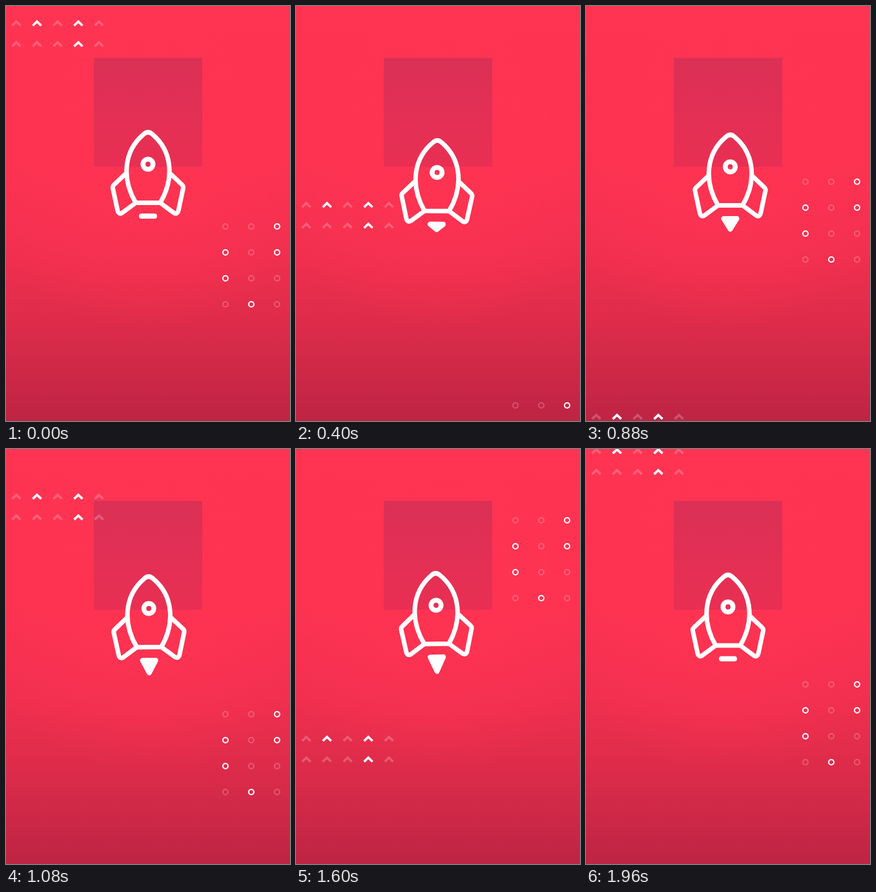
Write an HTML page that moves like this. It is 440 px wide and 640 px high and loops after 2000 ms.

```html
<!DOCTYPE html>
<html lang="en">
<head>
<meta charset="utf-8">
<title>Rocket</title>
<style>
  html, body { margin: 0; width: 100%; height: 100%; overflow: hidden; background: #ff3352; }
  svg { display: block; width: 440px; height: 640px; }
</style>
</head>
<body>
<svg viewBox="0 0 440 640">
  <defs>
    <linearGradient id="sky" x1="0" y1="0" x2="0" y2="1">
      <stop offset="0" stop-color="#ff3453"/>
      <stop offset=".36" stop-color="#fd3251"/>
      <stop offset=".6" stop-color="#f02f4f"/>
      <stop offset=".78" stop-color="#dc2b4a"/>
      <stop offset="1" stop-color="#be2443"/>
    </linearGradient>
    <radialGradient id="glow" gradientUnits="userSpaceOnUse" cx="220" cy="200" r="300">
      <stop offset="0" stop-color="#ff3352"/>
      <stop offset=".5" stop-color="#ff3352" stop-opacity=".6"/>
      <stop offset="1" stop-color="#ff3352" stop-opacity="0"/>
    </radialGradient>
    <linearGradient id="shade" x1="0" y1="0" x2="0" y2="1">
      <stop offset="0" stop-color="#db3055"/>
      <stop offset="1" stop-color="#e92f53"/>
    </linearGradient>
  </defs>
  <rect width="440" height="640" fill="url(#sky)"/>
  <rect width="440" height="640" fill="url(#glow)"/>
  <rect x="136" y="80" width="168" height="168" fill="url(#shade)"/>

  <g id="chevrons" fill="none" stroke="#fff" stroke-width="3.6"></g>
  <g id="rings" fill="none" stroke="#fff" stroke-width="2"></g>

  <g id="rocket" fill="none" stroke="#fff" stroke-width="7" stroke-linejoin="round" stroke-linecap="round">
    <path d="M201 303.5C180 268 181 225 213 198Q220 191.500 227 198C259 225 260 268 239 303.500Z"/>
    <path id="fin" d="M186 258L167 276Q164.800 278 165.500 281L173 316Q175 322 180 319L201 303.500"/>
    <use href="#fin" transform="matrix(-1 0 0 1 440 0)"/>
    <circle cx="220" cy="244" r="7.700" stroke-width="7.600"/>
    <path id="flame" fill="#fff" stroke-width="8"/>
  </g>
</svg>
<script>
const $ = id => document.getElementById(id);
const LOOP = 2000, STEP = 40, FPS = 30;

// Rows of marks: "1" is bright, "0" is faint.
function fillGrid(group, rows, x0, gap, rowGap, tag, attrs) {
  rows.forEach((row, r) => [...row].forEach((bit, c) => {
    const el = document.createElementNS("http://www.w3.org/2000/svg", tag);
    for (const key in attrs) el.setAttribute(key, attrs[key]);
    el.setAttribute("transform", `translate(${x0 + c * gap} ${r * rowGap})`);
    el.setAttribute("opacity", bit === "1" ? 1 : 0.22);
    group.append(el);
  }));
}
fillGrid($("chevrons"), ["01010", "00010"], 16, 32, 32, "path", { d: "M-6.5 3.2L0-3L6.5 3.2" });
fillGrid($("rings"), ["001", "101", "100", "010"], 340, 40, 40, "circle", { r: 4 });

// Rocket keys: tick, dx, dy, tilt, flame length
const keys = [
  [0, 0, 0, 0, 0],
  [6, -1, 20, 1.7, 0],
  [8, -1, 21, 1.2, 0],
  [17, -2, 1, -0.6, 19],
  [26, 3.5, 4, 0, 16],
  [38, -1, 0, -0.8, 22],
  [48, -3, -3, -0.8, 21.5],
  [58, 0, -1, 0, 0],
  [60, 0, 0, 0, 0]
];

function pose(tick) {
  const i = keys.findIndex(k => k[0] > tick);
  const a = keys[i - 1], b = keys[i];
  const u = (tick - a[0]) / (b[0] - a[0]);
  const e = u * u * (3 - 2 * u);
  return a.map((v, j) => v + (b[j] - v) * e);
}

// Falls at a steady speed and jumps back by span after passing 650.
function fall(start, speed, span, tick) {
  const top = 650 - span;
  return top + (start - top + speed * tick) % span;
}

function draw() {
  const time = Math.floor((performance.now() % LOOP) / STEP) * STEP;
  const tick = Math.round(time * FPS / 1000);
  const [, dx, dy, tilt, len] = pose(tick);
  $("chevrons").setAttribute("transform", `translate(0 ${fall(27, 70 / 3, 700, tick)})`);
  $("rings").setAttribute("transform", `translate(0 ${fall(340, 23, 667, tick)})`);
  $("rocket").setAttribute("transform", `translate(${dx} ${dy}) rotate(${tilt} 220 244)`);
  $("flame").setAttribute("d", `M210 324H230L220 ${324 + len}Z`);
  requestAnimationFrame(draw);
}
draw();
</script>
</body>
</html>
```
